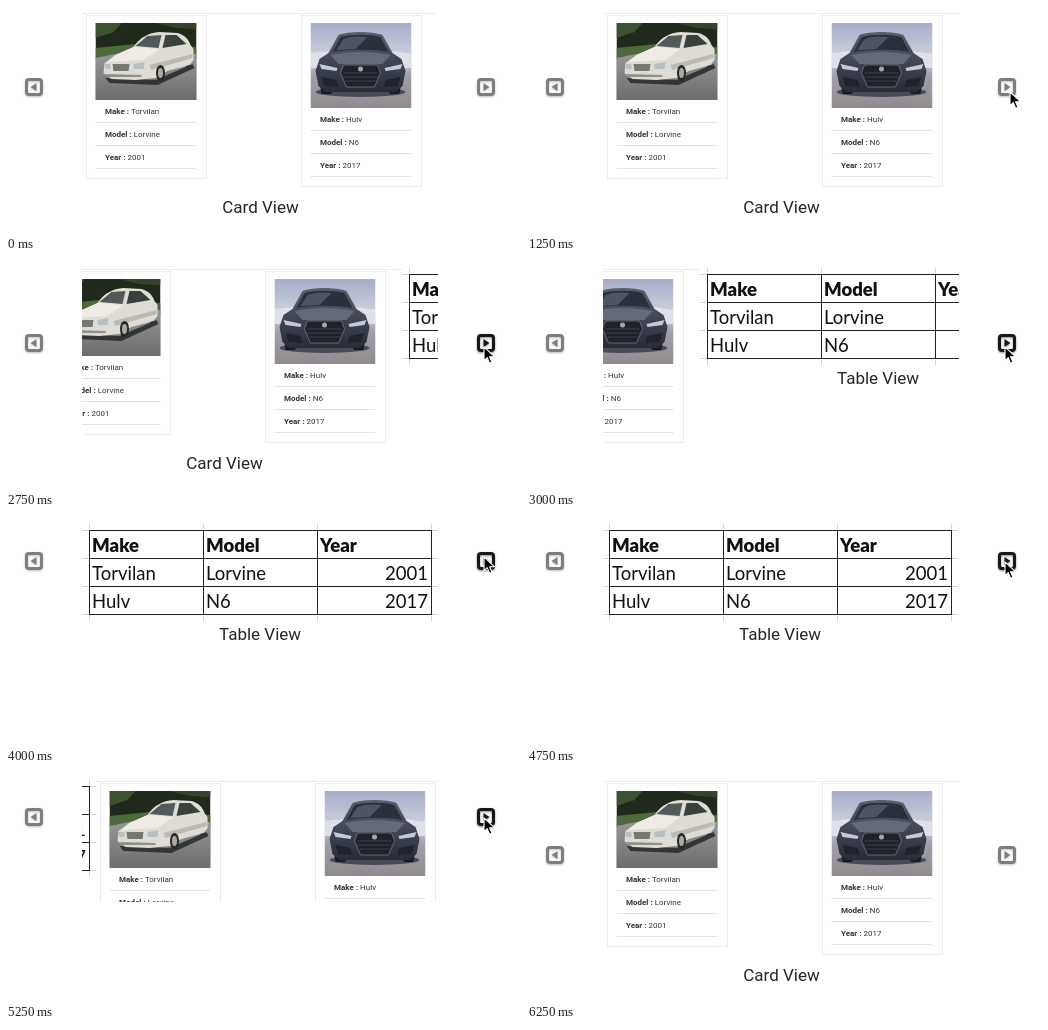
Write an HTML page that moves like this. It is 515 px wide and 228 px high and loops after 6.5 s.

```html
<!DOCTYPE html>
<html lang="en">
<head>
<meta charset="utf-8">
<title>Card and table carousel</title>
<style>
  html, body { margin: 0; width: 100%; height: 100%; overflow: hidden; background: #fff; }
  svg { display: block; width: 515px; height: 228px; }
  text { fill: #262626; }
  .label { font: 17px Roboto, "Liberation Sans", sans-serif; text-anchor: middle; }
  .field { font: 8px Roboto, "Liberation Sans", sans-serif; fill: #333; }
  .field tspan { font-weight: bold; }
  .cell { font: 18.5px Lato, "Open Sans", sans-serif; fill: #111; }
  .head { font-weight: 900; }
  .num { text-anchor: end; }
  .edge { fill: none; stroke: #ececec; }
  .rule { fill: none; stroke: #e4e4e4; }
  .grid { fill: none; stroke: #222; }
  .stub { fill: none; stroke: #d4d4d4; }
  .button { filter: drop-shadow(0 1px 1px rgba(0, 0, 0, .5)); }
</style>
</head>
<body>
<svg viewBox="0 0 515 228">
  <defs>
    <clipPath id="view"><rect id="port" x="76" y="6" width="356" height="210"/></clipPath>
    <clipPath id="frameA"><rect width="101" height="77"/></clipPath>
    <clipPath id="frameB"><rect width="101" height="85"/></clipPath>
    <linearGradient id="road" x2="0" y2="1">
      <stop offset="0" stop-color="#98989a"/><stop offset="1" stop-color="#6c6d6c"/>
    </linearGradient>
    <linearGradient id="hall" x2="0" y2="1">
      <stop offset="0" stop-color="#a6aeca"/><stop offset=".42" stop-color="#ced2de"/>
      <stop offset=".62" stop-color="#a09fab"/><stop offset="1" stop-color="#908a8c"/>
    </linearGradient>
    <linearGradient id="paint" x2="0" y2="1">
      <stop offset="0" stop-color="#5a5f70"/><stop offset="1" stop-color="#292c38"/>
    </linearGradient>
    <g id="button">
      <rect x="-7.5" y="-7.5" width="15" height="15" rx="2.5" fill="none" stroke="#000" stroke-width="3"/>
      <path d="M-2.5-4L3.5 0L-2.5 4Z"/>
    </g>
  </defs>

  <g clip-path="url(#view)">
    <g id="cards">
      <path class="edge" d="M76 7.5H432"/>
      <g id="cardList"></g>
      <text class="label" x="254.5" y="207">Card View</text>
    </g>
    <g id="table">
      <path class="stub" d="M76 12.5H432M76 40.5H432M76 68.5H432M76 96.5H432M83.5 6V103M197.5 6V103M311.5 6V103M425.5 6V103"/>
      <rect x="83" y="12" width="343" height="85" fill="#fff"/>
      <path class="grid" d="M83 12.5H426M83 40.5H426M83 68.5H426M83 96.5H426M83.5 12V97M197.5 12V97M311.5 12V97M425.5 12V97"/>
      <g id="cells"></g>
      <text class="label" x="254" y="122">Table View</text>
    </g>
  </g>

  <g id="prev" class="button" opacity=".5"><use href="#button" transform="scale(-1 1)"/></g>
  <g id="next" class="button"><use href="#button"/></g>
  <path id="cursor" d="M1 .8V14.6L4.2 11.6L6.6 17.2L9 16.2L6.6 10.7H11.4Z"
        stroke="#fff" stroke-width="1.1" stroke-linejoin="round"/>
</svg>

<script>
const $ = id => document.getElementById(id);
const LOOP = 6500, TICK = 250, WIDTH = 356;
const SLIDE = 600, TO_TABLE = 2617, TO_CARDS = 4733;

const cars = [
  { make: 'Torvilan', model: 'Lorvine', year: 2001, x: 80, photoH: 77, clip: 'frameA' },
  { make: 'Hulv', model: 'N6', year: 2017, x: 295, photoH: 85, clip: 'frameB' },
];

const sedan = `
  <rect width="101" height="77" fill="#20291b"/>
  <path d="M0 0H26L18 9L0 15Z" fill="#3c5230"/>
  <path d="M60 0H101V6L80 5Z" fill="#33462a"/>
  <path d="M0 25L40 21L101 24V36H0Z" fill="#4d6b3a"/>
  <path d="M0 35L30 29L101 31V77H0Z" fill="url(#road)"/>
  <path d="M10 55L60 57L97 41L99 45L62 62L14 60Z" fill="#343536"/>
  <ellipse cx="92" cy="38" rx="3" ry="6" fill="#282828"/>
  <path d="M38 24C45 14 53 10 64 9L82 10C89 12 93 16 95 22L98 26V37L94 42L72 48L60 55L40 57L16 56L8 50L9 40L20 32Z" fill="#dedcd4"/>
  <path d="M20 32L38 24L64 26L48 37L12 39Z" fill="#eeece5"/>
  <path d="M40 23L52 13L66 12L63 25Z" fill="#505a59"/>
  <path d="M67 25L70 12L81 12L91 21Z" fill="#39413f"/>
  <path d="M54 42L97 31V35L56 47Z" fill="#bbb9b0"/>
  <path d="M17 41H34L33 48H18Z" fill="#777872"/>
  <path d="M9 41H15V46H10ZM38 41L49 39L48 46H38Z" fill="#b9bfc0"/>
  <path d="M10 51L46 52V54L13 54Z" fill="#8f8e87"/>
  <ellipse cx="65" cy="50" rx="4.5" ry="8" fill="#292929"/>
  <ellipse cx="65" cy="50" rx="2.5" ry="5" fill="#a9a9a5"/>`;

const coupe = `
  <rect width="101" height="85" fill="url(#hall)"/>
  <path d="M0 30L18 28V45H0ZM82 28L101 31V45H82Z" fill="#dfe1e8"/>
  <ellipse cx="50" cy="69" rx="45" ry="5" fill="#4c4b54"/>
  <path d="M8 52H21V71H11ZM79 52H92L89 71H79Z" fill="#1a1c23"/>
  <path d="M28 12C38 8 62 8 72 12L82 30L91 36L95 48L92 63L85 69H15L8 63L5 48L9 36L18 30Z" fill="url(#paint)"/>
  <path d="M30 14C40 11 60 11 70 14L78 29C62 26 38 26 22 29Z" fill="#2b303c"/>
  <path d="M33 16C40 13 50 13 57 14L45 26L26 27Z" fill="#4d5463"/>
  <path d="M20 32C38 28 62 28 80 32L72 41H28Z" fill="#656a7b"/>
  <path d="M9 41L27 45L26 48L11 46ZM92 41L74 45L75 48L90 46Z" fill="#c3c9d6"/>
  <path d="M33 42H67L70 50L64 64H36L30 50Z" fill="#1f222a" stroke="#7d818d" stroke-width=".7"/>
  <path d="M33 50H67M32 54H68M35 58H65" stroke="#4c515d" stroke-width=".7"/>
  <path d="M11 54L26 57L28 64L14 63ZM90 54L75 57L73 64L87 63Z" fill="#20232b"/>
  <circle cx="50" cy="46" r="2.5" fill="#a4a7b0"/>`;

function card(car, art) {
  const left = car.x + 9.5, base = 17 + car.photoH;
  const rows = [['Make', car.make], ['Model', car.model], ['Year', car.year]].map(([key, value], i) => {
    const y = base + 14 + i * 23;
    return `<text class="field" x="${left + 9.5}" y="${y}"><tspan>${key} :</tspan> ${value}</text>
      <path class="rule" d="M${left} ${y + 8.5}h101"/>`;
  }).join('');
  return `<rect class="edge" x="${car.x + .5}" y="9.5" width="120" height="${base + 69}"/>
    <g transform="translate(${left} 17)" clip-path="url(#${car.clip})">${art}</g>${rows}`;
}

$('cardList').innerHTML = card(cars[0], sedan) + card(cars[1], coupe);
$('cells').innerHTML = [['Make', 'Model', 'Year'], ...cars.map(c => [c.make, c.model, c.year])]
  .map((row, r) => row.map((value, c) => {
    const num = r && c === 2;
    return `<text class="cell ${r ? '' : 'head'} ${num ? 'num' : ''}"
      x="${num ? 422 : 86 + c * 114}" y="${34 + r * 28}">${value}</text>`;
  }).join('')).join('');

// time, pointer x, pointer y (null: hidden), next button hovered
const steps = [
  [0, null, 0, 0], [500, 500, 1, 0], [750, null, 0, 0], [1000, 494, 93, 0],
  [1250, 482, 85, 0], [1500, 478, 84, 1], [2000, 473, 85, 1], [2250, 475, 83, 1],
  [2500, 477, 84, 1], [3750, 477, 70, 1], [4000, 477, 38, 1], [4250, 477, 41, 1],
  [4500, 477, 43, 1], [6000, null, 0, 1], [6250, null, 0, 0],
];

// CSS ease-in-out: cubic-bezier(.42, 0, .58, 1), solved by bisection
function easeInOut(x) {
  if (x <= 0 || x >= 1) return x <= 0 ? 0 : 1;
  let low = 0, high = 1, s;
  for (let i = 0; i < 20; i++) {
    s = (low + high) / 2;
    if (1.26 * s - .78 * s * s + .52 * s ** 3 < x) low = s; else high = s;
  }
  return 3 * s * s - 2 * s ** 3;
}

const slide = (t, from) => easeInOut((t - from) / SLIDE);
const move = (id, x, y) => $(id).setAttribute('transform', `translate(${x} ${y})`);

function draw(now) {
  const t = Math.floor(now % LOOP / TICK) * TICK;
  const [, x, y, hover] = steps.findLast(step => step[0] <= t);
  // 0: cards, 1: table, 2: cards again
  const pos = slide(t, TO_TABLE) + slide(t, TO_CARDS);
  const onTable = pos >= 1 && pos < 2;
  const buttonY = onTable ? 43 : 81;

  move('cards', Math.round(WIDTH * (pos < 1 ? -pos : 2 - pos)), 0);
  move('table', Math.round(WIDTH * (1 - pos)), 0);
  $('port').setAttribute('height', onTable ? 122 : 210);
  move('prev', 28, buttonY);
  move('next', 480, buttonY);
  $('next').setAttribute('opacity', hover ? .9 : .5);
  $('cursor').setAttribute('visibility', x === null ? 'hidden' : 'visible');
  move('cursor', x ?? 0, y);
}

const start = performance.now();
function loop() {
  draw(performance.now() - start);
  requestAnimationFrame(loop);
}
loop();
</script>
</body>
</html>
```
